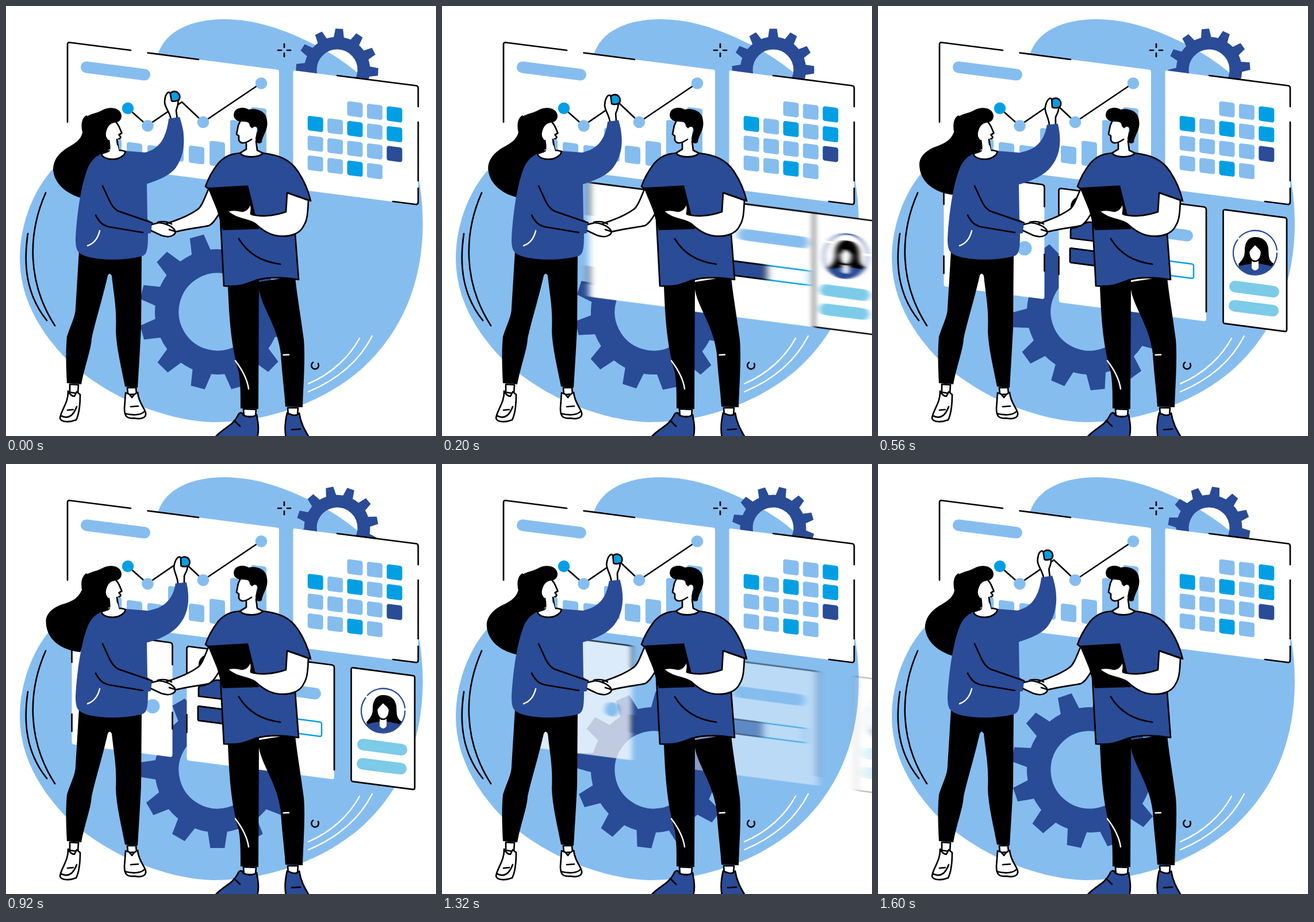
Recreate the animation shown at these times as an HTML page. Size 748 by 748 pixels, loop 1.64 s.

```html
<!DOCTYPE html>
<html lang="en">
<head>
<meta charset="utf-8">
<title>Teamwork</title>
<style>
html, body { margin: 0; width: 100%; height: 100%; overflow: hidden; background: #fff; }
svg { display: block; width: 100vw; height: 100vh; }
.k { fill: none; stroke: #000; }
.o { stroke: #000; }
.k, .o, .w { stroke-width: 2.7; stroke-linecap: round; stroke-linejoin: round; }
.w { fill: none; stroke: #fff; stroke-width: 2.4; }
.white { fill: #fff; }
.navy { fill: #2a4b96; }
.sky { fill: #86bdef; }
.cyan { fill: #009fe4; }
.pill { fill: none; stroke: #86bdef; stroke-width: 20; stroke-linecap: round; }
.teal { stroke: #7ccbe8; }
</style>
</head>
<body>
<svg viewBox="0 0 748 748">
  <defs>
    <clipPath id="disc"><circle cx="656" cy="429" r="38"/></clipPath>
    <g id="gear" class="navy">
      <circle r="88.3" fill="none" stroke="#2a4b96" stroke-width="41.5"/>
    </g>
  </defs>

  <path class="sky" d="M264 85C276 44 322 23 380 23C432 23 480 40 522 60C610 101 665 158 699 232C718 283 725 330 725 381C724 495 680 575 619 631C550 691 455 724 360 724C270 721 165 675 100 609C50 555 24 500 24 437C25 375 50 315 86 279C150 215 235 170 264 85Z"/>
  <path class="k" d="M69 325C38 395 36 480 85 556M38 396C30 450 35 502 71 547"/>
  <path class="w" d="M526 657C566 640 597 611 615 578M526 671C576 650 615 617 637 574"/>
  <path class="k" stroke-width="2.3" d="M484 66V72M484 82V88M473 77H479M489 77H495"/>
  <path class="k" d="M534 620A6.3 6.3 0 1 0 543 622"/>

  <use href="#gear" id="big"/>
  <use href="#gear" id="small"/>

  <!-- upper panels -->
  <g transform="matrix(1 .13 0 1 0 0)">
    <rect class="white" x="107" y="49.5" width="368" height="207" rx="3"/>
    <g id="bars" class="sky"></g>
    <rect class="white" x="499.5" y="47" width="217.5" height="206" rx="3"/>
    <g id="days"></g>
  </g>
  <path class="k" d="M107 202V67Q107 63 111 63.500L217 77M246.500 81.500L335 93"/>
  <path class="pill" d="M140 106.500L241 119.500"/>
  <path class="k" d="M212 178L246 208L306 167L343 202L444 134"/>
  <circle class="cyan" cx="212" cy="178" r="10.200"/>
  <g class="sky"><circle cx="246.500" cy="208.500" r="10.300"/><circle cx="343" cy="202" r="10.300"/><circle cx="444" cy="134.500" r="10.300"/></g>
  <path class="k" d="M576 121L713 138.500Q717 139 717 143V175M717 202V304M717 317V341Q717 346 712 345L673 340"/>

  <!-- sliding cards -->
  <g transform="matrix(1 .13 0 1 0 0)">
    <g class="card">
      <rect class="white" x="114.500" y="273.500" width="175" height="199" rx="4"/>
      <g transform="matrix(1 -.13 0 1 0 0)">
        <path class="k" d="M114.500 345V292Q115 288 119 289L285 310.500Q289.500 311 289.500 316V349M289.500 432V461M114.500 435V465"/>
        <circle class="sky" cx="255" cy="421.500" r="12.500"/>
      </g>
    </g>
    <g class="card">
      <rect class="white" x="314.500" y="276" width="256.500" height="198.500" rx="4"/>
      <rect x="334" y="377.700" width="215" height="25" rx="3" fill="#fff" stroke="#009fe4" stroke-width="2.500"/>
      <rect class="navy o" x="334" y="377.700" width="139" height="25" rx="2"/>
      <g transform="matrix(1 -.13 0 1 0 0)">
        <path class="k" d="M314.500 377V321Q314.500 317 319 317.500L567 349.500Q571 350 571 355V532M314.500 436V467"/>
        <circle cx="353" cy="349" r="18"/>
        <path class="navy o" d="M335 404V390Q335 386 340 386C351 386 356 375 370 376L400 384V412Z"/>
        <path class="pill" d="M433 385.500L538 399.500"/>
      </g>
    </g>
    <g class="card">
      <rect class="white o" x="600.500" y="276" width="110.500" height="198" rx="3"/>
      <g transform="matrix(1 -.13 0 1 0 0)">
        <g clip-path="url(#disc)">
          <path d="M657 402C645 401 638 411 638 425C638 437 634 441 627 449L630 462H684L690 449C678 443 680 433 679 421C677 408 668 402 657 402Z"/>
          <path class="navy" d="M615 458C630 450 642 450 650 448H662C675 450 685 452 697 457V470H615Z"/>
          <path class="white" d="M650 440H662V456Q656 464 650 456Z"/>
          <path class="white o" stroke-width="1.500" d="M645 427C648 421 652 419 656 414C660 420 666 421 667 428C667 438 662 444 656 444C650 444 645 438 645 427Z"/>
        </g>
        <path d="M626 406A38 38 0 0 0 686 453A38 38 0 0 0 694 429M628 403A38 38 0 0 1 694 425" fill="none" stroke="#2a4b96" stroke-width="2.300"/>
        <path class="pill teal" d="M621 488L688 497M620 521.500L687 530"/>
      </g>
    </g>
  </g>

  <!-- woman -->
  <path id="hair"/>
  <path class="white" d="M176 236L174 212C178 203 186 201 193 203L196 211L201.500 221L197 224L199 229L196 232Q195 235 191 236L195 252L207 254C203 272 176 272 167 258Z"/>
  <path class="k" stroke-width="2" d="M192 203C197 208 197 212 201.500 221L196.500 224L199.500 228Q199 231 196 231M181 249L179 234M193 232L196 251L203 253"/>
  <path d="M133 200C139 188 152 189 166 182C182 173 197 178 200 187C203 194 199 202 189 203C180 204 176 211 174 220C172 232 181 231 181 243C180 254 172 256 162 262L135 260Z"/>
  <path d="M127 426L236 431L235 560C233 600 231 630 229 664L207 662C201 630 192 595 191 565C193 525 187 500 184 469Q180 462 177 469C165 520 155 550 149 578C148 598 138 622 131 658L106 656C104 620 104 595 106 575C113 553 121 540 121 525Z"/>
  <g class="white o">
    <path d="M111 658V672L125 674L126 659ZM211 664L212 676L227 675L226 664Z"/>
    <path d="M108 670C109 690 95 704 94 717C96 725 112 724 122 720C128 708 129 690 129 676L123 671L119 679Q113 679 108 670ZM208 673L206 700C206 714 210 718 224 717C239 720 244 714 243 708C240 697 231 691 229 672L223 676L219 681L214 675Z"/>
  </g>
  <path class="k" stroke-width="2.200" d="M107 703L117 702M96 713C108 719 117 713 123 697M217 697L230 696M207 709C223 713 236 711 241 705"/>
  <g id="hand">
    <circle class="cyan o" cx="293" cy="158" r="9.300"/>
    <path class="white o" d="M287 198C286 186 277 178 276 168C276 160 278 154 281 151C284 149 286 151 286 154L288 165C292 167 296 165 299 164C301 171 297 176 296 182L298 197Z"/>
  </g>
  <path id="arm" class="navy"/>
  <path class="navy" d="M167 256C152 264 149 270 144 278C133 302 124 350 121 405C121 425 125 430 138 435C165 443 205 443 237 435C245 432 247 425 247 396L252 395L254 377L246 371L245 309L245 255L207 252C203 271 177 271 167 256Z"/>
  <path class="white o" stroke-width="2" d="M166 257C169 270 203 271 208 253L200 251L181 252Z"/>
  <path class="white" d="M182 240L194 242L197 253L204 253L205 258L172 259L181 252Z"/>
  <path class="k" d="M168 313C178 333 182 350 196 357L254 377M156 364C163 377 168 381 178 384L238 394"/>
  <path class="w" d="M142 417C153 413 160 404 163 391"/>

  <!-- man -->
  <path d="M386 486L440 476V495L439 701L408 700C408 675 408 655 405 638C395 600 389 570 386 486ZM440 480L503 470C505 495 512 535 518 580C521 615 517 660 516 698L486 697C484 665 480 640 478 605C472 555 445 525 440 493Z"/>
  <path class="w" d="M399 617C411 633 420 650 422 666M482.500 607L492 606.500"/>
  <path class="white o" d="M413 701L414 714H434L435 702ZM490 699L491 712H507L508 699Z"/>
  <path class="navy o" d="M364 750C375 736 395 730 403 713C406 706 411 706 413 712Q426 718 436 711C438 722 441 738 437 750ZM489 708C485 725 485 740 487 750H527C520 738 513 727 510 708Q505 714 497 711Z"/>
  <path class="k" d="M397 721L407 731M497 737L512 736"/>
  <path class="white o" d="M353 317C346 332 341 349 333 354C318 365 300 371 276 380L290 394C315 387 341 385 353 382C362 378 367 366 373 358L365 320Z"/>
  <path class="white o" d="M254 380L266 377C276 378 284 381 290 386C296 391 296 396 290 399C284 403 276 401 270 399L253 391"/>
  <path class="k" d="M264 376Q277 373 288 379M284 389L294 392"/>
  <path class="navy o" d="M407 256C388 257 378 264 369 274C358 288 351 302 347 314L355 320L372 350L374 390L379 487C405 489 415 485 435 477C460 470 490 473 509 476L503 397L490 325L530 339C525 318 518 303 508 288C494 267 475 259 447 256Z"/>
  <path class="white" d="M407 199L404 207L401 223L405 226L405 234Q408 241 418 239V249L407 256C413 264 441 264 447 256L436 251L434 232L437 207Z"/>
  <path class="k" stroke-width="2.200" d="M408 199L404 208L401 223L405 226V233Q409 244 427 232M418 239V249L407 256C415 265 440 264 447 256L437 251L435 235"/>
  <path d="M397 185C400 176 415 175 422 180C437 177 453 183 454 199C457 215 446 225 445 237C441 241 434 239 434 230L436 221C441 212 433 206 428 213L424 209C424 201 418 201 408 201C399 200 394 193 397 185Z"/>
  <path d="M351 316L421 312L440 388L377 390L367 355Z"/>
  <path class="white o" d="M489 325L526 338C525 356 525 371 518 382C511 397 493 402 474 400C456 398 443 387 435 380C424 370 402 373 385 357C392 354 402 355 410 357C418 357 423 350 425 343C429 351 426 356 426 362C440 367 464 366 487 358Z"/>
  <path class="k" d="M405 405C420 430 445 445 477 449"/>
</svg>
<script>
const LOOP = 1640, STEP = 40;
const $ = s => document.querySelector(s);
const clamp = x => Math.min(1, Math.max(0, x));
const ease = x => x < .5 ? 2 * x * x : 1 - 2 * (1 - x) ** 2;

// Blend two paths that share the same commands.
const NUM = /-?[\d.]+/g;
const mix = (a, b, p) => {
  const to = b.match(NUM);
  let i = 0;
  return a.replace(NUM, n => (n * (1 - p) + to[i++] * p).toFixed(2));
};

const HAIR = [
  'M140 190C131 195 130 208 133 220C130 234 118 240 106 247C89 258 82 271 82 284C83 305 100 325 131 334L165 264L150 205Z',
  'M140 190C131 195 130 208 132 219C126 232 117 238 104 242C83 247 69 259 69 273C69 300 88 322 129 327L165 264L150 205Z'
];
const ARM = [
  'M205 253C225 258 240 257 250 252C268 245 279 228 283 196L302 193C312 222 314 255 295 282C284 296 262 304 243 310L205 300Z',
  'M205 253C225 258 242 257 252 254C274 250 291 236 295 208L314 206C320 232 319 258 302 279C290 295 265 306 243 311L205 300Z'
];

let teeth = '';
for (let a = 0; a < 360; a += 30)
  teeth += `<path d="M-18 -100L-12.500 -136H12.500L18 -100Z" transform="rotate(${a})"/>`;
$('#gear').innerHTML += teeth;

const BAR_TOPS = [206, 209, 209.5, 175, 201, 188, 147, 120];
$('#bars').innerHTML = BAR_TOPS.map((y, i) =>
  `<rect x="${174 + 36 * i}" y="${y}" width="27" height="${231 - y}" rx="4"/>`).join('');

const DAYS = ['  ssc', 'cscsc', 'ssssn', 'sscs '];
const TONE = { s: 'sky', c: 'cyan', n: 'navy' };
$('#days').innerHTML = DAYS.map((row, r) => [...row].map((d, c) => TONE[d]
  ? `<rect class="${TONE[d]}" x="${524.7 + 34.4 * c}" y="${88 + 34.4 * r}" width="27" height="25.500" rx="4"/>`
  : '').join('')).join('');

// Each card: [enter, leave] start times in ms.
const TIMES = [[80, 1226], [40, 1186], [0, 1158]];
const TRAVEL = 208, SLIDE = 300;
const shift = (i, t) => {
  const [enter, leave] = TIMES[i];
  return t < 700 ? TRAVEL * (1 - ease(clamp((t - enter) / SLIDE)))
                 : TRAVEL * ease(clamp((t - leave) / SLIDE));
};
const fade = (i, t) => {
  const [enter, leave] = TIMES[i];
  return t < 700 ? clamp((t - enter) / 100) : 1 - clamp((t - leave - 50) / 150);
};

const cards = [...document.querySelectorAll('.card')];
const blurs = cards.map((card, i) => {
  $('defs').insertAdjacentHTML('beforeend',
    `<filter id="blur${i}" x="-20%" y="-5%" width="140%" height="110%" color-interpolation-filters="sRGB"><feGaussianBlur/></filter>`);
  return $(`#blur${i} feGaussianBlur`);
});

function draw(t) {
  const s = t / 1000;
  $('#big').setAttribute('transform', `translate(368 532) rotate(${14.6 + 16.8 * s})`);
  $('#small').setAttribute('transform', `translate(576 111) scale(.525) rotate(${3 - 14.8 * s})`);

  const sway = (1 - Math.cos(2 * Math.PI * t / LOOP)) / 2;
  const reach = 1 - (1 - 2 * t / LOOP) ** 2;
  $('#hair').setAttribute('d', mix(...HAIR, sway));
  $('#arm').setAttribute('d', mix(...ARM, reach));
  $('#hand').setAttribute('transform',
    `translate(${12.5 * reach} ${12.5 * reach}) rotate(${8 * reach} 292 195)`);

  cards.forEach((card, i) => {
    const speed = Math.abs(shift(i, t + 5) - shift(i, t - 5)) / 10;
    const alpha = fade(i, t);
    card.style.display = alpha ? '' : 'none';
    card.setAttribute('opacity', alpha);
    card.setAttribute('transform', `translate(${shift(i, t)} 0)`);
    blurs[i].setAttribute('stdDeviation', `${(speed * 5).toFixed(2)} 0`);
    if (speed > .02) card.setAttribute('filter', `url(#blur${i})`);
    else card.removeAttribute('filter');
  });
}

function tick() {
  const t = performance.now() % LOOP;
  draw(Math.floor(t / STEP) * STEP);
  requestAnimationFrame(tick);
}
tick();
</script>
</body>
</html>
```
